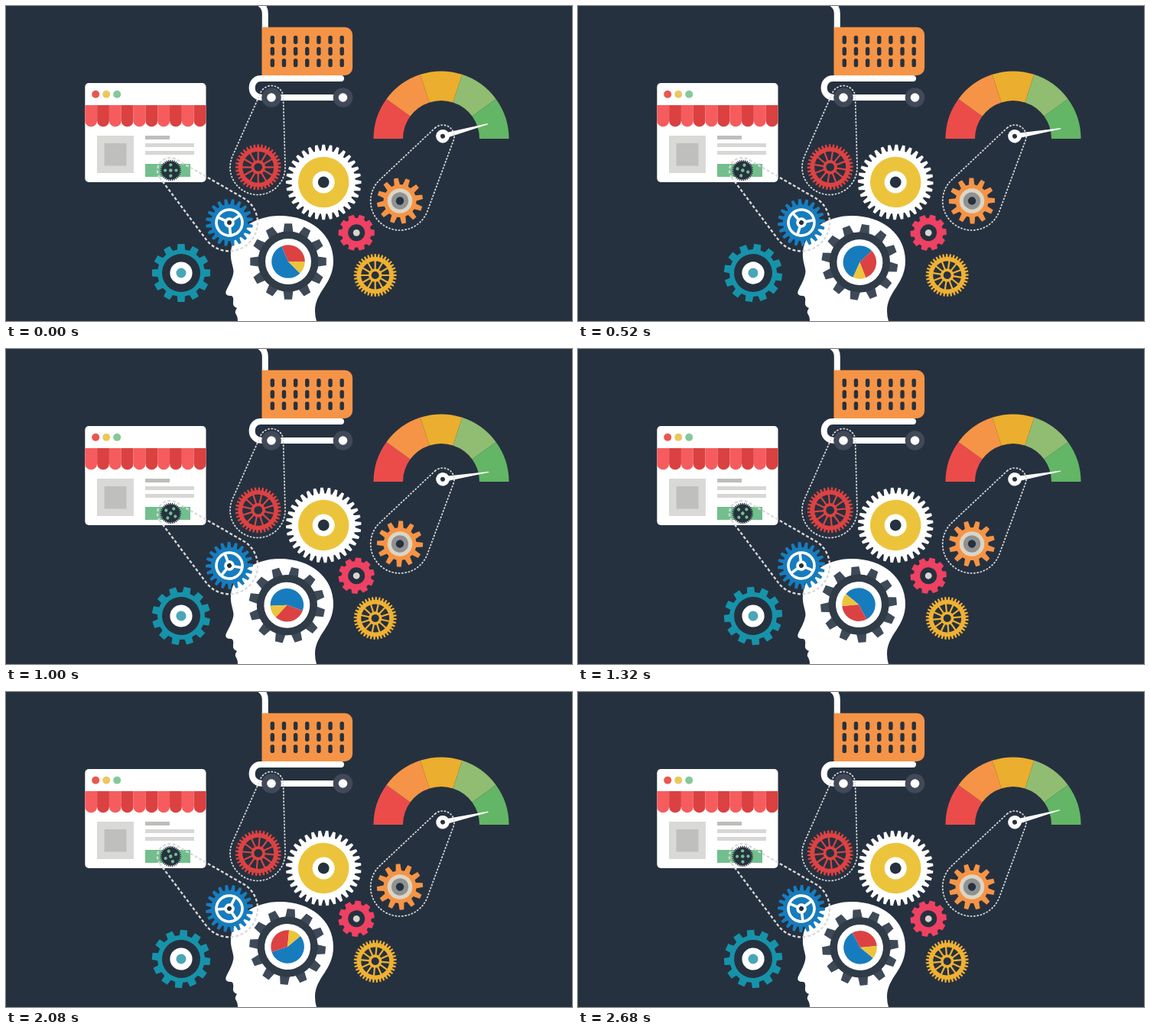
An HTML page with a canvas that plays this animation: 740x413 px, repeating every 2720 ms.

```html
<!DOCTYPE html>
<html lang="en">
<head>
<meta charset="utf-8">
<title>Gears</title>
<style>
html, body { margin: 0; width: 100%; height: 100%; overflow: hidden; background: #26313f; }
canvas { display: block; }
</style>
</head>
<body>
<canvas id="stage" width="740" height="413"></canvas>
<script>
const ctx = document.getElementById('stage').getContext('2d');
const TAU = Math.PI * 2, RAD = Math.PI / 180;
const LOOP = 2720, STEP = 40;
const BG = '#26313f', WHITE = '#fff';

function disc(x, y, r, color) {
  ctx.fillStyle = color;
  ctx.beginPath();
  ctx.arc(x, y, r, 0, TAU);
  ctx.fill();
}

function box(x, y, w, h, color, radius = 0) {
  ctx.fillStyle = color;
  ctx.beginPath();
  ctx.roundRect(x, y, w, h, radius);
  ctx.fill();
}

function sector(x, y, r, from, to, color, inner = 0) {
  ctx.fillStyle = color;
  ctx.beginPath();
  ctx.arc(x, y, r, from * RAD, to * RAD);
  if (inner) ctx.arc(x, y, inner, to * RAD, from * RAD, true);
  else ctx.lineTo(x, y);
  ctx.fill();
}

function stroke(path, width, color = WHITE, cap = 'butt') {
  ctx.strokeStyle = color;
  ctx.lineWidth = width;
  ctx.lineCap = cap;
  ctx.stroke(new Path2D(path));
}

// Runs draw() with the origin at (x, y), turned by some degrees.
function turned(x, y, degrees, draw) {
  ctx.save();
  ctx.translate(x, y);
  ctx.rotate(degrees * RAD);
  draw();
  ctx.restore();
}

function gear(count, outer, root, color, base = 0.66, tip = 0.4) {
  const pitch = TAU / count;
  ctx.fillStyle = color;
  ctx.beginPath();
  for (let i = 0; i < count; i++) {
    const a = i * pitch;
    for (const [r, d] of [[root, -base], [outer, -tip], [outer, tip], [root, base]]) {
      const angle = a + d * pitch / 2;
      ctx.lineTo(r * Math.cos(angle), r * Math.sin(angle));
    }
  }
  ctx.fill();
}

function spokes(count, from, to, width, color, offset = 0) {
  ctx.strokeStyle = color;
  ctx.lineWidth = width;
  ctx.lineCap = 'butt';
  ctx.beginPath();
  for (let i = 0; i < count; i++) {
    const a = offset * RAD + i * TAU / count;
    ctx.moveTo(from * Math.cos(a), from * Math.sin(a));
    ctx.lineTo(to * Math.cos(a), to * Math.sin(a));
  }
  ctx.stroke();
}

function spokedWheel(r, color) {
  gear(36, r, r - 4, color);
  disc(0, 0, r - 9.5, BG);
  spokes(12, 6, r - 8, 2.2, color);
  disc(0, 0, r * 0.31, color);
  disc(0, 0, r * 0.18, BG);
}

// Dashed outline around two pulleys.
function belt(x1, y1, r1, x2, y2, r2, width, dash) {
  const axis = Math.atan2(y2 - y1, x2 - x1);
  const spread = Math.acos((r1 - r2) / Math.hypot(x2 - x1, y2 - y1));
  ctx.strokeStyle = '#d9dada';
  ctx.lineWidth = width;
  ctx.lineCap = 'butt';
  ctx.setLineDash(dash);
  ctx.beginPath();
  ctx.arc(x1, y1, r1, axis + spread, axis - spread + TAU);
  ctx.arc(x2, y2, r2, axis - spread, axis + spread);
  ctx.closePath();
  ctx.stroke();
  ctx.setLineDash([]);
}

function cart() {
  stroke('M332 -3Q338.8 1 338.8 10V29', 8);
  box(334.5, 27.8, 118.6, 63.2, '#f59446', [0, 10, 10, 0]);
  for (let col = 0; col < 7; col++)
    for (let row = 0; row < 3; row++)
      box(345.6 + col * 15.15, 38.7 + row * 15.1, 5.4, 11.2, BG, 2.7);
  stroke('M438 95H333C318 95 317 120 335 120H440', 8, WHITE, 'round');
  for (const x of [347, 440.5]) {
    disc(x, 120, 12.8, '#414958');
    disc(x, 120, 5.8, WHITE);
  }
}

function shop() {
  box(103.3, 101, 158.2, 130, WHITE, 5);
  ['#e8574f', '#ecc75f', '#84c999'].forEach((c, i) => disc(117.2 + i * 14, 115.7, 5, c));
  for (let i = 0; i < 10; i++)
    box(103.3 + i * 15.82, 130, 15.82, 28.3, i % 2 ? '#db4141' : '#f65c5d', [0, 0, 7.9, 7.9]);
  box(119, 170, 48, 49, '#d9d9d8');
  box(128.5, 180, 29, 29.5, '#bfbfbe');
  box(182, 170, 32, 5, '#bdbdbc');
  box(182, 180, 64, 5, '#d7d7d6');
  box(182, 190, 64, 5, '#d7d7d6');
  box(182, 207, 59, 17, '#72bf8d');
}

function gauge(needle) {
  ['#eb4c4a', '#f59446', '#ebae2e', '#90bd72', '#63b665'].forEach((c, i) =>
    sector(569, 174, 88.5, 180 + i * 36, 216 + i * 36, c, 50));
  turned(571, 170.7, needle, () => {
    ctx.fillStyle = WHITE;
    ctx.fill(new Path2D('M0 -3.6L61 -.6V.6L0 3.6Z'));
    disc(0, 0, 8.8, WHITE);
    disc(0, 0, 3, BG);
  });
}

function head() {
  ctx.fillStyle = WHITE;
  ctx.fill(new Path2D('M358 275C399 275 428 300 428 334C428 365 404 374 404 400Q404 407 406 413' +
    'H303Q303 407 300 403Q299 400 302 396Q296 394 297 388Q298 380 294 380' +
    'Q286 380 287.5 374C291 366 297 357 297.5 348C297 340 293 334 294 322C297 294 325 275 358 275Z'));
}

function draw(t) {
  const p = t / LOOP, turn = 360 * p;
  const needle = p < 0.25 ? -15.3 + 7.6 * p / 0.25 : -7.7 - 7.6 * (p - 0.25) / 0.75;

  box(0, 0, 740, 413, BG);
  cart();
  shop();
  gauge(needle);
  head();

  turned(215.3, 215.5, turn / 4, () => {
    gear(32, 13.8, 11.8, BG);
    disc(0, 0, 2.3, '#72bf8d');
    for (let i = 0; i < 4; i++)
      disc(7.2 * Math.cos(i * TAU / 4), 7.2 * Math.sin(i * TAU / 4), 2.1, '#72bf8d');
  });

  turned(292, 284, 9 + turn / 3, () => {
    gear(20, 31, 24, '#177cbd', 0.72, 0.36);
    disc(0, 0, 18.8, WHITE);
    disc(0, 0, 15.2, '#177cbd');
    spokes(3, 3, 17, 3.6, WHITE, 76);
    disc(0, 0, 6.8, WHITE);
    disc(0, 0, 3, BG);
  });

  turned(229, 350, turn, () => {
    gear(12, 38.3, 31, '#1693aa', 0.62, 0.46);
    disc(0, 0, 25, BG);
    disc(0, 0, 14.6, WHITE);
    disc(0, 0, 6.5, '#4aa6b7');
  });

  turned(329.7, 211.3, turn, () => spokedWheel(30, '#dc4242'));
  turned(482.7, 353, turn, () => spokedWheel(28, '#efb133'));

  turned(415.2, 231, turn, () => {
    gear(32, 49.3, 41.5, WHITE, 0.78, 0.36);
    disc(0, 0, 33.2, '#ecc43c');
    disc(0, 0, 14.5, WHITE);
    disc(0, 0, 7.4, BG);
  });

  turned(458.2, 297.3, turn, () => {
    gear(10, 23.8, 19.3, '#ee4163', 0.74, 0.5);
    disc(0, 0, 11, BG);
    disc(0, 0, 4.4, '#dad4d0');
  });

  turned(515, 255.5, 20 + turn, () => {
    gear(12, 30.2, 21.5, '#f59446', 0.66, 0.36);
    disc(0, 0, 16.3, '#dcd5c4');
    disc(0, 0, 11.2, '#8f9193');
    disc(0, 0, 5.2, BG);
  });

  // The large gear sits one pixel off its axis.
  turned(368, 335, turn, () => {
    ctx.translate(1, 0);
    gear(12, 50, 39.5, '#3f4a58', 0.62, 0.38);
    disc(0, 0, 39.5, '#303b48');
    disc(0, 0, 30, WHITE);
    sector(0, 0, 21.8, 45, 247, '#177cbd');
    sector(0, 0, 21.8, 247, 360, '#dc4242');
    sector(0, 0, 21.8, 0, 45, '#ecc43c');
  });

  belt(214.5, 215.5, 16.5, 291.7, 284, 37.3, 2.3, [4, 2.6]);
  belt(347, 120, 15.5, 329, 211.5, 36, 1.7, [2.6, 1.7]);
  belt(571, 171, 15, 515, 255.7, 38.3, 1.7, [2.6, 1.7]);
}

function tick(now) {
  draw(Math.floor(now % LOOP / STEP) * STEP);
  requestAnimationFrame(tick);
}
requestAnimationFrame(tick);
</script>
</body>
</html>
```
